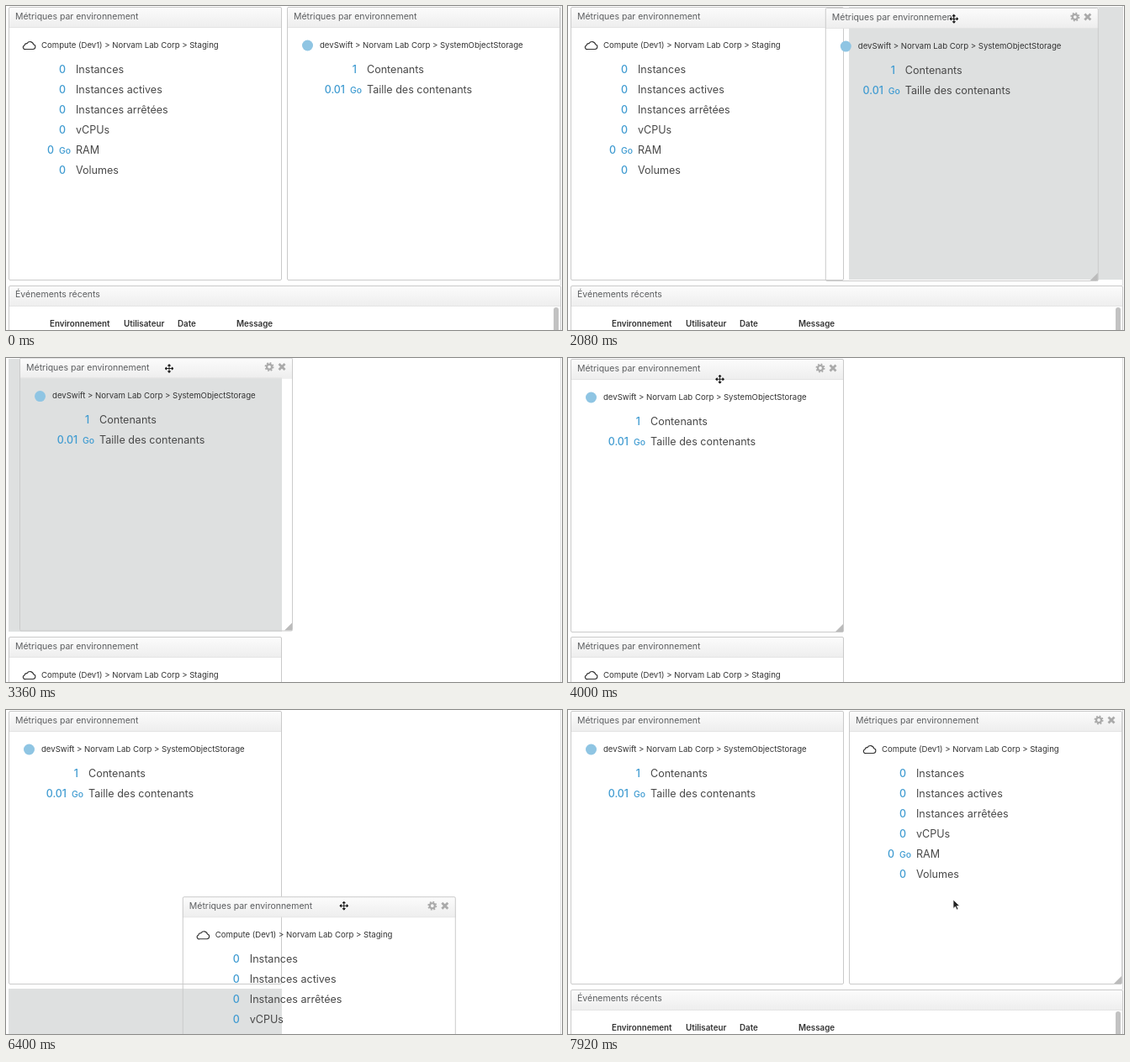
Write an HTML page that moves like this. It is 661 by 386 pixels and loops after 8 s.

```html
<!DOCTYPE html>
<html lang="fr">
<head>
<meta charset="utf-8">
<title>Tableau de bord</title>
<style>
html, body { margin: 0; width: 661px; height: 386px; overflow: hidden; background: #fff; }
svg { display: block; font-family: Inter, "Open Sans", sans-serif; }
.frame { fill: none; stroke: #cacaca; }
.title { font-size: 10.5px; fill: #5c5e60; }
.crumb { font-size: 9.58px; fill: #333; }
.label { font-size: 12.55px; fill: #484848; }
.value { font-size: 12.4px; font-weight: 500; fill: #3f9bd1; text-anchor: end; }
.unit { font-size: 10.4px; font-weight: 500; fill: #3f9bd1; text-anchor: end; }
.col { font-size: 9.8px; font-weight: 600; fill: #333; }
</style>
</head>
<body>
<svg id="stage" width="661" height="386" viewBox="0 0 661 386">
  <defs>
    <linearGradient id="bar" x2="0" y2="1">
      <stop stop-color="#fcfcfc"/><stop offset="1" stop-color="#eee"/>
    </linearGradient>
  </defs>
  <path d="M659.5 0V386" stroke="#ddd"/>
</svg>
<script>
const stage = document.getElementById('stage');
const LOOP = 8000, STEP = 80;

function add(parent, tag, attrs = {}, text = '') {
  const el = document.createElementNS('http://www.w3.org/2000/svg', tag);
  for (const k in attrs) el.setAttribute(k, attrs[k]);
  el.textContent = text;
  parent.append(el);
  return el;
}
const write = (g, cls, x, y, text) => add(g, 'text', { class: cls, x, y }, text);
const place = (el, [x, y]) => el.setAttribute('transform', `translate(${x} ${y})`);
const show = (el, on) => el.setAttribute('visibility', on ? 'visible' : 'hidden');

const within = (t, a, b) => t >= a && t < b;
const ramp = (t, a, b) => Math.min(1, Math.max(0, (t - a) / (b - a)));
const ease = (t, a, b) => { const u = ramp(t, a, b); return u * u * (3 - 2 * u); };
const mix = (p, q, f) => p.map((v, i) => v + (q[i] - v) * f);
const shift = ([x, y], dx, dy) => [x + dx, y + dy];

function panel(title, width, titleY = 15) {
  const g = add(stage, 'g');
  g.body = add(g, 'rect', { width, height: 325, fill: '#fff' });
  add(g, 'rect', { width, height: 24, fill: 'url(#bar)' });
  add(g, 'path', { d: `M0 24.5H${width}`, stroke: '#e4e4e4' });
  add(g, 'rect', { class: 'frame', x: .5, y: .5, width: width - 1, height: 325, rx: 1.5 });
  write(g, 'title', 8, titleY, title);
  return g;
}

function metrics(crumb, labelX, rows) {
  const g = panel('Métriques par environnement', 325);
  write(g, 'crumb', 39, 48.5, crumb);
  rows.forEach(([value, label, unit], i) => {
    const y = 78.5 + 24 * i;
    write(g, 'value', labelX - (unit ? 26 : 12), y, value);
    if (unit) write(g, 'unit', labelX - 6, y, unit);
    write(g, 'label', labelX, y, label);
  });
  const tools = g.tools = add(g, 'g', { fill: 'none', stroke: '#aaa' });
  add(tools, 'circle', { cx: 297, cy: 11, r: 3, 'stroke-width': 2.2 });
  add(tools, 'circle', { cx: 297, cy: 11, r: 4.6, 'stroke-width': 1.8, 'stroke-dasharray': '1.8 1.813' });
  add(tools, 'path', { d: 'M308.5 7.5l7 7m0-7l-7 7', 'stroke-width': 2.8 });
  add(tools, 'path', { d: 'M324 316v9h-9z', fill: '#bbb', stroke: 'none' });
  return g;
}

const events = panel('Événements récents', 657, 14);
[[49, 'Environnement'], [137, 'Utilisateur'], [201, 'Date'], [271, 'Message']]
  .forEach(([x, name]) => write(events, 'col', x, 48.5, name));
add(events, 'rect', { x: 648, y: 26, width: 6, height: 90, rx: 3, fill: '#c2c2c2' });

const compute = metrics('Compute (Dev1) > Norvam Lab Corp > Staging', 80, [
  ['0', 'Instances'], ['0', 'Instances actives'], ['0', 'Instances arrêtées'],
  ['0', 'vCPUs'], ['0', 'RAM', 'Go'], ['0', 'Volumes']]);
add(compute, 'path', {
  d: 'M20.5 50.5h8.6a2.9 2.9 0 0 0 .6-5.7a4.2 4.2 0 0 0-7.7-1.2a2.8 2.8 0 0 0-3 2.4a2.3 2.3 0 0 0 1.5 4.5z',
  fill: 'none', stroke: '#333', 'stroke-width': 1.1 });

const storage = metrics('devSwift > Norvam Lab Corp > SystemObjectStorage', 95, [
  ['1', 'Contenants'], ['0.01', 'Taille des contenants', 'Go']]);
add(storage, 'circle', { cx: 24.5, cy: 46, r: 6.5, fill: '#8fc5e3' });

const slot = add(stage, 'rect', { width: 325, height: 325, fill: '#dee0e0' });

const pointer = add(stage, 'g');
const shapes = {
  arrow: add(pointer, 'path', { d: 'M0 0v10.5l2.5-2.3l1.7 3.8l1.8-.8l-1.7-3.7h3.4z', fill: '#222', stroke: '#fff', 'stroke-width': .7 }),
  move: add(pointer, 'path', { d: 'M-4 0H4M0-4V4M-5 0l1.7-1.5v3zM5 0l-1.7-1.5v3zM0-5l-1.5 1.7h3zM0 5l-1.5-1.7h3z', fill: '#111', stroke: '#111', 'stroke-width': .9 }),
  beam: add(pointer, 'path', { d: 'M-2.5-5.5Q0-5.5 0-4Q0-5.5 2.5-5.5M0-4V4M-2.5 5.5Q0 5.5 0 4Q0 5.5 2.5 5.5', fill: 'none', stroke: '#222' })
};

// Grid cells a widget can rest in
const LEFT = [3, 1], RIGHT = [334, 1], BELOW = [3, 332];

// Dragged left with a slight arc, then snapped into its cell
function storageAt(t) {
  const held = mix(RIGHT, [16, -.5], ease(t, 1790, 3370));
  const arc = 2.2 * Math.sin(Math.PI * ramp(t, 1790, 3370));
  return mix(shift(held, 0, arc), LEFT, ease(t, 3520, 3760));
}

// Pushed down, dragged to the right with a pause, then snapped
function computeAt(t) {
  if (t < 5600) return mix(LEFT, BELOW, ease(t, 2400, 2720));
  return mix(mix(BELOW, [344, 151], ease(t, 5600, 7000)), RIGHT, ease(t, 7120, 7520));
}

const eventsAt = t => [3, 333 + 332 * (ease(t, 2400, 2640) - ease(t, 7120, 7520))];

const slotAt = t => t < 4000 ? mix(RIGHT, LEFT, ease(t, 2560, 2820)) : mix(BELOW, RIGHT, ease(t, 6400, 6720));

// The first widget trails the pointer by 120 ms
const holdStorage = t => shift(storageAt(t + 120), 178, 13);
const holdCompute = t => shift(computeAt(t), 192, 11);

function pointerAt(t) {
  const title = [168, 342];
  if (t < 1520) return mix([592, -14], holdStorage(0), ease(t, 480, 1120));
  if (t < 4640) return mix(holdStorage(t), title, ease(t, 3920, 4640));
  if (t < 5600) return mix(title, holdCompute(t), ease(t, 5120, 5280));
  return mix(holdCompute(t), [458, 226], ease(t, 7520, 7920));
}

function pointerKind(t) {
  if (t < 560) return '';
  if (within(t, 4640, 5200)) return 'beam';
  return within(t, 960, 4080) || within(t, 5200, 7600) ? 'move' : 'arrow';
}

let front;
function raise(active, other) {
  if (front === active) return;
  front = active;
  stage.append(events, other, slot, active, pointer);
}

function draw(now) {
  const t = Math.floor(now % LOOP / STEP) * STEP;
  const dragStorage = within(t, 1520, 3760), dragCompute = within(t, 5680, 7440);
  if (t < 4000) raise(storage, compute); else raise(compute, storage);

  place(storage, storageAt(t));
  place(compute, computeAt(t));
  place(events, eventsAt(t));
  place(slot, slotAt(t));
  place(pointer, pointerAt(t));

  show(storage.body, !dragStorage);
  show(compute.body, !dragCompute);
  show(slot, dragStorage || dragCompute);
  show(storage.tools, within(t, 640, 4560));
  show(compute.tools, within(t, 5200, 6560) || t >= 7520);

  const kind = pointerKind(t);
  for (const k in shapes) show(shapes[k], k === kind);
}

const start = performance.now();
(function tick() {
  draw(performance.now() - start);
  requestAnimationFrame(tick);
})();
</script>
</body>
</html>
```
